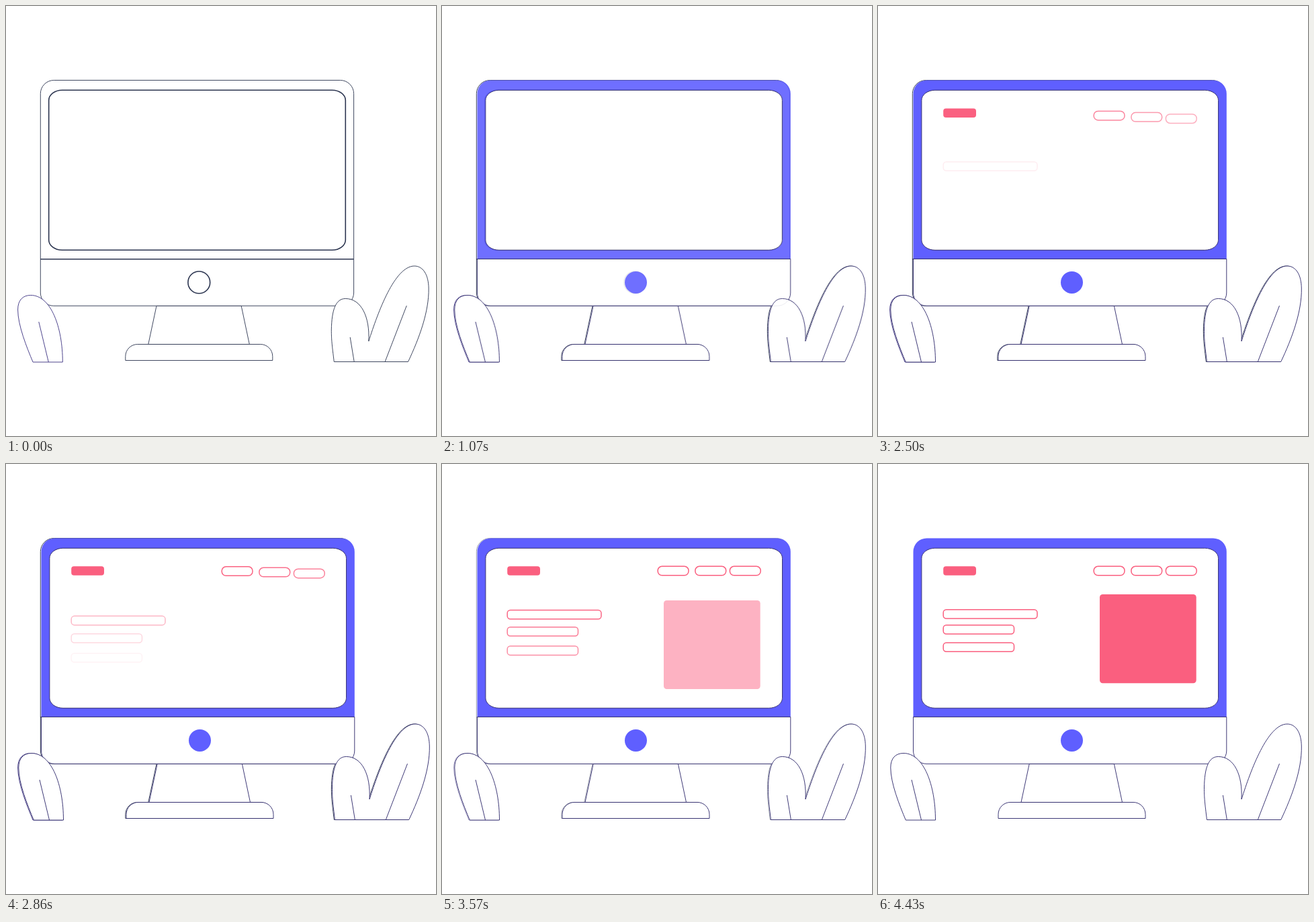
Write an HTML page that moves like this. It is 640x640 px and loops after 7.21 s.

```html
<!DOCTYPE html>
<html lang="en">
<head>
<meta charset="utf-8">
<title>Screen build-up</title>
<style>
  html, body { margin: 0; width: 100%; height: 100%; overflow: hidden; background: #fff; }
  svg { display: block; width: 100vw; height: 100vh; }
  .line { fill: #fff; stroke: #2a2468; stroke-width: .9; }
  .blue { fill: #5f5fff; }
  .solid { fill: #fa5f7f; }
  .hollow { fill: #fff; stroke: #fa5f7f; stroke-width: 1.5; }
  #sketch .line { stroke: #2c3550; stroke-width: .9; }
  #sketch .bold { stroke-width: 1.6; }
  #sketch .violet { stroke: #3a3080; }
</style>
</head>
<body>
<svg viewBox="0 0 640 640">
  <defs>
    <path id="stand" d="M225.2 446.3H351.4L363.5 503.5H213Z"/>
    <path id="base" d="M179 527.5V521.5A18 18 0 0 1 197 503.5H380A18 18 0 0 1 398 521.5V527.5Z"/>
    <path id="panel" d="M52.5 376.5H518.8V427A19.5 19.5 0 0 1 499.3 446.3H72A19.5 19.5 0 0 1 52.5 427Z"/>
    <rect id="screen" x="64.9" y="125.3" width="441.6" height="238" rx="20" ry="15"/>
    <path id="leaf" d="M41.3 530C32 508 18.8 475 18.8 452C18.8 438 26 430.5 38 430.5C68 430.5 85.5 478 85.5 530ZM50 470L64.5 530"/>
    <path id="leaves" d="M489.5 529.5C486.5 505 485.5 497 485.5 482C486 452 492 435.5 506.5 435.5C530 435.5 543 463 541 499C555 455 580 387 609 387C622 387 630 400 630.3 420C631 455 616 495 599.7 529.5ZM513.4 493L519.4 529.5M597.5 446L565.3 529.5"/>
  </defs>

  <g id="sketch" transform="translate(-1.2 0)">
    <use href="#stand" class="line"/>
    <use href="#base" class="line"/>
    <path class="line" d="M52.5 376.5V130.5A20 20 0 0 1 72.5 110.5H498.8A20 20 0 0 1 518.8 130.5V376.5"/>
    <use href="#panel" class="line"/>
    <path class="line bold" d="M52.5 376.7H518.8"/>
    <use href="#screen" class="line bold"/>
    <circle class="line bold" cx="288.5" cy="411.4" r="16.4"/>
    <use href="#leaf" class="line violet"/>
    <use href="#leaves" class="line"/>
  </g>

  <g id="final">
    <use href="#stand" class="line"/>
    <use href="#base" class="line"/>
    <path class="blue" fill-rule="evenodd" d="M52.5 376.5V130.5A20 20 0 0 1 72.5 110.5H498.8A20 20 0 0 1 518.8 130.5V376.5ZM84.9 125.3A20 15 0 0 0 64.9 140.3V348.3A20 15 0 0 0 84.9 363.3H486.5A20 15 0 0 0 506.5 348.3V140.3A20 15 0 0 0 486.5 125.3Z"/>
    <use href="#panel" class="line"/>
    <use href="#screen" class="line"/>
    <circle class="blue" cx="288.5" cy="411.4" r="16.5"/>
    <use href="#leaf" class="line"/>
    <use href="#leaves" class="line"/>
  </g>

  <g id="page"></g>
</svg>
<script>
const LOOP = 7210, FPS = 14, FADE = 1300, RISE = 17, BLOCK_START = 3060;

// class, x, y, width, height, radius, start in ms
const parts = [
  ['solid', 97.2, 152.3, 48.8, 13.5, 4, 1231],
  ['hollow', 321.2, 152.3, 45.8, 13.5, 6.3, 1638],
  ['hollow', 376.9, 152.3, 45.8, 13.5, 6.3, 1806],
  ['hollow', 428.4, 152.3, 45.8, 13.5, 6.3, 1975],
  ['hollow', 97.2, 216.8, 139.8, 13.3, 4.5, 2392],
  ['hollow', 97.2, 239.7, 105.3, 13.3, 4.5, 2615],
  ['hollow', 97.2, 266, 105.3, 13.3, 4.5, 2785],
  ['solid', 330, 194, 143.7, 132.2, 4.5, BLOCK_START],
].map(([name, x, y, width, height, rx, start]) => {
  const el = document.createElementNS('http://www.w3.org/2000/svg', 'rect');
  const attrs = { class: name, x, y, width, height, rx };
  for (const key in attrs) el.setAttribute(key, attrs[key]);
  document.getElementById('page').append(el);
  return { el, start };
});

const sketch = document.getElementById('sketch');
const finished = [...document.getElementById('final').children];

function progress(time, start) {
  const u = Math.min(1, Math.max(0, (time - start) / FADE));
  return 1 - (1 - u) ** 1.3;
}

function draw(now) {
  const step = Math.floor((now % LOOP + 5) * FPS / 1000);
  const time = step * 1000 / FPS;

  // Each shape fades on its own, so the sketch shows through overlaps.
  const shown = progress(time, 0);
  for (const el of finished) el.style.opacity = shown;
  sketch.style.opacity = 1 - progress(time, BLOCK_START);

  for (const { el, start } of parts) {
    const p = progress(time, start);
    el.style.opacity = p;
    el.setAttribute('transform', `translate(0 ${RISE * (1 - p)})`);
  }
}

const begin = performance.now();
function tick() {
  draw(performance.now() - begin);
  requestAnimationFrame(tick);
}
tick();
</script>
</body>
</html>
```
